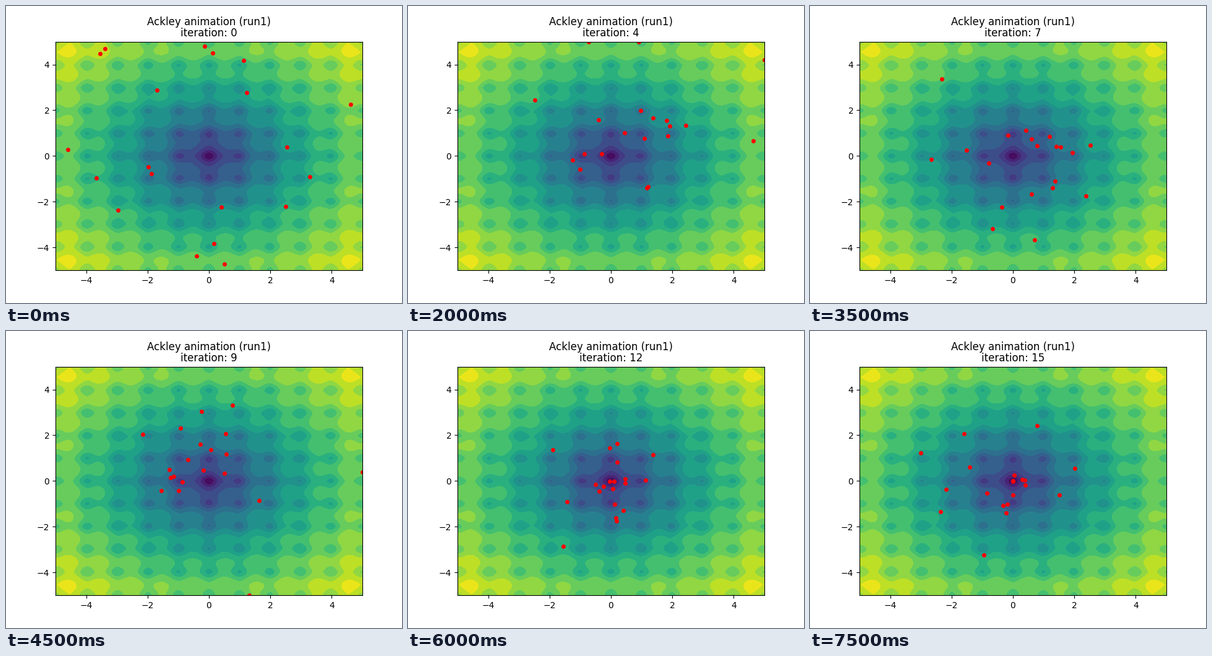
Write a matplotlib script that moves like this. It is 640 by 480 pixels and loops after 8000 ms.

```python
import numpy as np
import matplotlib.pyplot as plt
from matplotlib.animation import FuncAnimation

STEPS, STEP_MS = 16, 500
SWARM = 20
LIMIT = 5
INERTIA, PULL = 0.7, 1.8


def ackley(x, y):
    r = np.sqrt((x**2 + y**2) / 2)
    waves = (np.cos(2 * np.pi * x) + np.cos(2 * np.pi * y)) / 2
    return 20 - 20 * np.exp(-0.2 * r) + np.e - np.exp(waves)


def swarm_path(seed):
    """Particle swarm search; returns the positions at every iteration."""
    rng = np.random.default_rng(seed)
    pos = rng.uniform(-LIMIT, LIMIT, (SWARM, 2))
    vel = np.zeros_like(pos)
    best, cost = pos.copy(), ackley(*pos.T)
    path = [pos]
    for _ in range(STEPS - 1):
        leader = best[cost.argmin()]
        own, social = rng.uniform(0, PULL, (2, SWARM, 2))
        vel = INERTIA * vel + own * (best - pos) + social * (leader - pos)
        pos = np.clip(pos + vel, -LIMIT, LIMIT)
        now = ackley(*pos.T)
        better = now < cost
        best[better], cost[better] = pos[better], now[better]
        path.append(pos)
    return path


path = swarm_path(seed=1)

fig, ax = plt.subplots(figsize=(6.4, 4.8), dpi=100)
axis = np.linspace(-LIMIT, LIMIT, 201)
X, Y = np.meshgrid(axis, axis)
ax.contourf(X, Y, ackley(X, Y), levels=np.arange(16), cmap="viridis")
ax.set(xlim=(-LIMIT, LIMIT), ylim=(-LIMIT, LIMIT))
dots, = ax.plot([], [], "o", color="red", markersize=4)
title = ax.set_title("", linespacing=1.0)


def update(step):
    dots.set_data(*path[step].T)
    title.set_text(f"Ackley animation (run1)\niteration: {step}")
    return dots, title


anim = FuncAnimation(fig, update, frames=STEPS, interval=STEP_MS,
                     repeat=True, repeat_delay=0)
plt.show()
```
